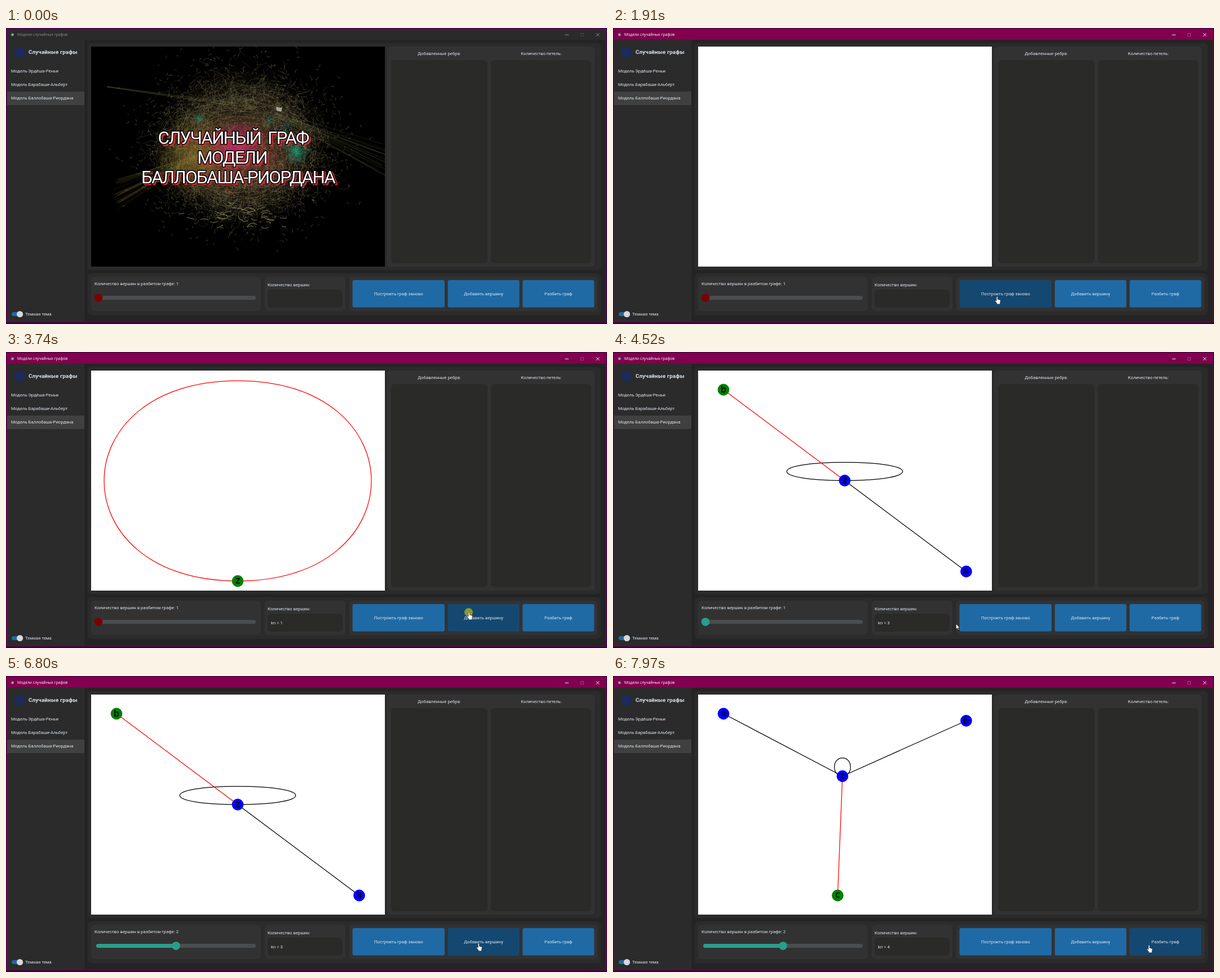
Write an HTML page with a canvas that moves like this. It is 1066 by 526 pixels and loops after 8 s.

```html
<!DOCTYPE html>
<html lang="ru">
<head>
<meta charset="utf-8">
<title>Модели случайных графов</title>
<style>
html, body { margin: 0; width: 1066px; height: 526px; overflow: hidden; background: #3a003c; }
svg, canvas { position: absolute; left: 0; top: 0; }
canvas { left: 151px; top: 33px; }
text { font: 7.82px Roboto, sans-serif; fill: #dce4ee; }
.mid { text-anchor: middle; }
.head { font-size: 9.7px; font-weight: 700; letter-spacing: .2px; }
.bar { font: 6.8px "Open Sans", "Noto Sans", sans-serif; }
.cover { font: 400 31.5px Roboto, sans-serif; letter-spacing: -1.9px; text-anchor: middle; stroke-linejoin: round; white-space: pre; }
.node { font: 15.5px "DejaVu Sans", sans-serif; fill: #000; stroke: #000; stroke-width: .4px; text-anchor: middle; }
</style>
</head>
<body>
<svg id="chrome" width="1066" height="526"></svg>
<canvas id="art" width="521" height="391"></canvas>
<svg id="over" width="1066" height="526"></svg>
<script>
const LOOP = 8000, STEP = 100 / 3;
const $ = id => document.getElementById(id);

const box = (x, y, x2, y2, fill, r = 0, extra = '') =>
  `<rect x="${x}" y="${y}" width="${x2 - x}" height="${y2 - y}" rx="${r}" fill="${fill}" ${extra}/>`;
const label = (x, y, s, cls = '', extra = '') => `<text x="${x}" y="${y}" class="${cls}" ${extra}>${s}</text>`;
const dot = (x, y, r, fill, extra = '') => `<circle cx="${x}" cy="${y}" r="${r}" fill="${fill}" ${extra}/>`;

// Window, sidebar, panels
const BUTTONS = [[614.6, 778, 'Построить граф заново'], [783.6, 910.6, 'Добавить вершину'], [916.3, 1043.3, 'Разбить граф']];
const PANEL = '#2b2b2b', CARD = '#323232', WELL = '#2a2a29';

$('chrome').innerHTML =
  box(1.5, 1.5, 1064.5, 522.5, '#242424', 0, 'id="frame"') +
  box(2, 2, 1064, 21, '#2b2a2b', 0, 'id="bar"') +
  dot(11.5, 12, 2.4, '#7fa3ad') +
  label(20, 14.4, 'Модели случайных графов', 'bar', 'id="caption"') +
  '<g id="controls" fill="none" stroke="#9a9a9a" stroke-width=".9"><path d="M991.5 12.3h6.5"/>' +
  '<path d="M1019.5 9.5h5v5h-5z" opacity=".28"/><path d="M1046.8 9.2l5.6 5.6m0-5.6l-5.6 5.6"/></g>' +
  box(2, 21, 139, 522, PANEL) +
  dot(24, 43, 9.5, '#1b2c5c') +
  label(40, 46.4, 'Случайные графы', 'head') +
  box(2, 113, 139, 137, '#404040') +
  ['Эрдёша-Реньи', 'Барабаши-Альберт', 'Баллобаша-Риордана']
    .map((s, i) => label(9, 79 + i * 24.1, 'Модель ' + s)).join('') +
  box(10, 505, 28, 512, '#1f6aa5', 3.5) + dot(24.6, 508.5, 5.6, '#d5d9de') +
  label(34, 511.2, 'Темная тема') +
  box(145, 27, 1055, 430, PANEL, 6) +
  box(676, 33, 1044, 424, CARD, 6) +
  box(683, 57, 854, 418, WELL, 6) + box(860, 57, 1038, 418, WELL, 6) +
  label(768.5, 47.6, 'Добавленные ребра:', 'mid') + label(949.5, 47.6, 'Количество петель:', 'mid') +
  box(145, 436, 1055, 510, PANEL, 6) +
  box(151, 442, 452, 503, CARD, 6) + box(459, 442, 602, 503, CARD, 6) + box(609, 442, 1049, 503, CARD, 6) +
  label(157, 456.8, '', '', 'id="parts"') +
  box(160, 476, 443, 483, '#4a4d50', 3.5) +
  box(160, 476, 302, 483, '#2a9d8c', 3.5, 'id="fill"') +
  dot(164, 479.6, 7.4, '#7a0000', 'id="knob"') +
  label(464, 459, 'Количество вершин:') +
  box(464, 465, 597, 497, WELL, 6) +
  label(470, 484.3, '', '', 'id="count"') +
  BUTTONS.map(([a, b, s], i) => box(a, 448, b, 496.5, '#1f6aa5', 3, `id="btn${i}"`) +
    label((a + b) / 2, 474.8, s, 'mid')).join('');

// Cover title and graphs
const TITLE = [[403, 206, 'СЛУЧАЙНЫЙ  ГРАФ'], [401, 241, 'МОДЕЛИ'], [411.5, 275.5, 'БАЛЛОБАША-РИОРДАНА']];
const titleLayer = (d, paint) => TITLE.map(([x, y, s]) => label(x + d, y + d, s, 'cover', `style="${paint}"`)).join('');

// loop: [x, y, half width of handles, height]; edges: [from, to]; the newest part is red / green
const GRAPHS = [
  { nodes: [['z', 411, 407]], loop: [411, 407, 316, 356], edges: [] },
  { nodes: [['z', 626.5, 390], ['a', 196, 67]], loop: [626.5, 390, 22, 32.5], edges: [[0, 1]] },
  { nodes: [['z', 411, 228.5], ['a', 626.5, 390], ['b', 196, 67]], loop: [411, 228.5, 137, 32.5], edges: [[0, 1], [0, 2]] },
  { nodes: [['z', 407, 178], ['a', 196, 67], ['b', 626.5, 79.5], ['c', 398.5, 390]], loop: [407, 178, 19, 32.5], edges: [[0, 1], [0, 2], [0, 3]] }
];

function graphMarkup({ nodes, loop: [x, y, w, h], edges }, i) {
  const last = nodes.length - 1;
  const stroke = on => `fill="none" stroke="${on ? '#f00' : '#000'}" stroke-width="1.25"`;
  const ring = `<path d="M${x} ${y - h}c${w} 0 ${w} ${h} 0 ${h}s${-w} ${-h} 0 ${-h}" ${stroke(!last)}/>`;
  const lines = edges.map(([a, b]) =>
    `<path d="M${nodes[a][1]} ${nodes[a][2]}L${nodes[b][1]} ${nodes[b][2]}" ${stroke(b === last)}/>`).join('');
  const dots = nodes.map(([s, nx, ny], k) => dot(nx, ny, 10.4, k === last ? '#008000' : '#00f') +
    label(nx, ny + (s === 'b' ? 5.3 : 4.3), s, 'node')).join('');
  return `<g id="graph${i}">${ring}${lines}${dots}</g>`;
}

$('over').innerHTML =
  '<g id="cover">' + titleLayer(2.6, 'fill:#d23a3a;stroke:#c23034;stroke-width:2.5') +
  titleLayer(0, 'fill:#000;stroke:#000;stroke-width:3') + titleLayer(0, 'fill:#fff') + '</g>' +
  box(151, 33, 672, 424, '#fff', 0, 'id="paper"') +
  GRAPHS.map(graphMarkup).join('') +
  '<g id="cursor">' + dot(0, 0, 7.4, '#a5a81c', 'id="press" opacity=".84"') +
  '<g fill="#fff" stroke="#111" stroke-width=".5">' +
  '<path id="arrow" d="M0 0V9.2L2.1 7.3 3.6 10.7 5 10.1 3.6 6.8H6.4Z"/>' +
  '<path id="hand" d="M-.3.9Q-.3-.2.8-.2T1.9.9V4.8L6 5.7Q6.9 6 6.8 7.2L6 11V13.2H.4V11.6L-2.8 7.8Q-3 6.4-1.6 6.5L-.3 7.7Z"/></g></g>';

// Cover picture: a dense coloured network on black
function paintArt() {
  const c = $('art').getContext('2d');
  let seed = 11;
  const rnd = () => {
    seed = seed + 0x6D2B79F5 | 0;
    let v = Math.imul(seed ^ seed >>> 15, 1 | seed);
    v ^= v + Math.imul(v ^ v >>> 7, 61 | v);
    return ((v ^ v >>> 14) >>> 0) / 4294967296;
  };
  const gauss = () => rnd() + rnd() + rnd() + rnd() - 2;
  const cx = 265, cy = 178, TAU = Math.PI * 2;
  const thread = (x, y, a, len, color, w = .6) => {
    const bend = (rnd() - .5) * len;
    c.strokeStyle = color;
    c.lineWidth = w;
    c.beginPath();
    c.moveTo(x, y);
    c.quadraticCurveTo(x + Math.cos(a) * len / 2 - Math.sin(a) * bend, y + Math.sin(a) * len / 2 + Math.cos(a) * bend,
      x + Math.cos(a) * len, y + Math.sin(a) * len);
    c.stroke();
  };
  const glow = (x, y, r, rgb, alpha) => {
    const g = c.createRadialGradient(x, y, 0, x, y, r);
    g.addColorStop(0, `rgba(${rgb},${alpha})`);
    g.addColorStop(.45, `rgba(${rgb},${alpha * .55})`);
    g.addColorStop(1, `rgba(${rgb},0)`);
    c.fillStyle = g;
    c.fillRect(x - r, y - r, 2 * r, 2 * r);
  };
  const tuft = (x, y, r, n, rgb) => {
    for (let i = 0; i < n; i++) thread(x, y, rnd() * TAU, r * (.3 + rnd() * .7), `rgba(${rgb},.3)`);
  };
  const beam = (x, y, x2, y2, spread, n, rgb) => {
    for (let i = 0; i < n; i++) {
      c.strokeStyle = `rgba(${rgb},${.06 + rnd() * .2})`;
      c.lineWidth = .5 + rnd() * 1.4;
      c.beginPath();
      c.moveTo(x + gauss() * 8, y + gauss() * 4);
      c.lineTo(x2 + gauss() * spread / 3, y2 + gauss() * spread);
      c.stroke();
    }
  };

  c.fillStyle = '#000';
  c.fillRect(0, 0, 521, 391);
  beam(285, 106, 28, 72, 2, 9, '125,120,70');
  beam(330, 120, 521, 205, 24, 26, '120,120,75');
  beam(190, 195, 45, 262, 24, 38, '115,105,45');

  glow(cx, cy, 150, '90,78,48', .55);
  glow(180, 198, 75, '125,115,25', .5);
  glow(215, 190, 75, '160,85,35', .45);
  glow(290, 190, 75, '165,60,55', .45);
  glow(257, 178, 48, '200,30,125', .8);
  glow(364, 186, 24, '20,140,110', .5);

  for (let i = 0; i < 3000; i++) {
    const a = rnd() * TAU, r = 82 + gauss() * 42;
    thread(cx + Math.cos(a) * r * 1.28, cy + Math.sin(a) * r * 1.1, rnd() * TAU, 4 + rnd() * 18, 'rgba(160,150,100,.3)', .7);
  }
  for (let i = 0; i < 220; i++) {
    const a = rnd() * TAU;
    c.strokeStyle = 'rgba(155,145,98,.2)';
    c.beginPath();
    c.ellipse(cx + gauss() * 40, cy + gauss() * 24, 60 + rnd() * 65, 50 + rnd() * 60, 0, a, a + .6 + rnd() * 1.6);
    c.stroke();
  }
  for (let i = 0; i < 650; i++) {
    const a = rnd() * TAU, r = 118 + gauss() * 40;
    thread(cx + Math.cos(a) * r * 1.35, cy + Math.sin(a) * r * 1.15, rnd() * TAU, 2 + rnd() * 5, 'rgba(145,140,100,.5)', .9);
  }
  for (let i = 0; i < 40; i++)
    thread(270 + gauss() * 75, 298 + gauss() * 18, gauss() * .5, 6 + rnd() * 12, 'rgba(160,155,100,.55)', 1.4);
  for (let i = 0; i < 1100; i++) {
    const x = 250 + gauss() * 75;
    thread(x, 180 + gauss() * 52, rnd() * TAU, 5 + rnd() * 14,
      x < 205 ? 'rgba(165,150,60,.22)' : x < 280 ? 'rgba(215,100,105,.2)' : 'rgba(200,120,90,.22)');
  }
  tuft(364, 186, 28, 110, '25,155,125');
  tuft(345, 150, 30, 45, '25,140,120');
  tuft(316, 132, 18, 30, '25,140,120');
  tuft(190, 128, 15, 45, '35,155,110');
  tuft(245, 258, 16, 25, '200,95,50');
  c.fillStyle = '#a5a59c';
  c.beginPath();
  c.moveTo(328, 107); c.lineTo(339, 109); c.lineTo(337, 116); c.lineTo(329, 114);
  c.fill();
}

// Pointer moves: start, end, from, bend, to
const MOVES = [
  [230, 940, [1044, 522], [960, 250], [680.5, 477.5]],
  [1910, 2510, [680.5, 477.5], [803, 446.6], [820.5, 462.5]],
  [4240, 4960, [820.5, 462.5], [450, 508], [171, 481]],
  [4990, 5050, [171, 481], [174, 481], [175, 480]],
  [5250, 5750, [175, 480], [271, 477], [267, 480]],
  [6020, 6800, [267, 480], [520, 486], [837.5, 475.5]],
  [6920, 7630, [837.5, 475.5], [848, 496], [868, 480]],
  [7660, 7970, [868, 480], [915, 474], [950, 478.5]]
];
const PRESSES = [[1110, 1240], [2740, 2840], [3740, 3810], [4170, 4240], [5250, 5770], [6850, 6920]];
const GROWTH = [2840, 3810, 4240, 6920];

function pointer(t) {
  const move = MOVES.filter(m => t >= m[0]).pop() || MOVES[0];
  const [start, end, from, bend, to] = move;
  const q = Math.max(0, Math.min(1, (Math.floor((t + 5) / STEP) * STEP - start) / (end - start)));
  const u = q * q * (3 - 2 * q), v = 1 - u;
  return from.map((p, i) => v * v * p + 2 * u * v * bend[i] + u * u * to[i]);
}

const set = (id, name, value) => $(id).setAttribute(name, value);
const show = (id, on) => set(id, 'visibility', on ? 'visible' : 'hidden');

function draw(now) {
  const t = now % LOOP;
  const [x, y] = pointer(t);
  const inside = (a, b, top, bottom) => t >= 230 && x >= a && x <= b && y >= top && y <= bottom;

  const active = t >= 1110;
  set('frame', 'stroke', active ? '#80004f' : '#5c0a62');
  set('bar', 'fill', active ? '#80004f' : '#2b2a2b');
  $('caption').style.fill = active ? '#fff' : '#8e8e8e';
  set('controls', 'stroke', active ? '#fff' : '#9a9a9a');

  const n = GROWTH.filter(g => t >= g).length;
  show('cover', t < 1240);
  show('paper', t >= 1240);
  GRAPHS.forEach((g, i) => show('graph' + i, n === i + 1));
  $('count').textContent = n ? 'kn = ' + n : '';

  const split = t >= 5250 && (t >= 5770 || x >= 231);
  const onSlider = n > 1 && inside(157, 446, 471, 488);
  $('parts').textContent = 'Количество вершин в разбитом графе: ' + (split ? 2 : 1);
  show('fill', split);
  set('knob', 'cx', split ? 301.5 : 164);
  set('knob', 'fill', n < 2 ? '#7a0000' : onSlider ? '#144870' : '#2a9d8c');

  let hand = onSlider;
  BUTTONS.forEach(([a, b], i) => {
    const hover = inside(a, b, 448, 497);
    hand = hand || hover;
    set('btn' + i, 'fill', hover ? '#144870' : '#1f6aa5');
  });
  const seen = t >= 230;
  set('cursor', 'transform', `translate(${x.toFixed(2)} ${y.toFixed(2)})`);
  show('hand', seen && hand);
  show('arrow', seen && !hand);
  show('press', PRESSES.some(([a, b]) => t >= a && t < b));
}

paintArt();
const began = performance.now();
const tick = () => {
  draw(performance.now() - began);
  requestAnimationFrame(tick);
};
tick();
</script>
</body>
</html>
```
